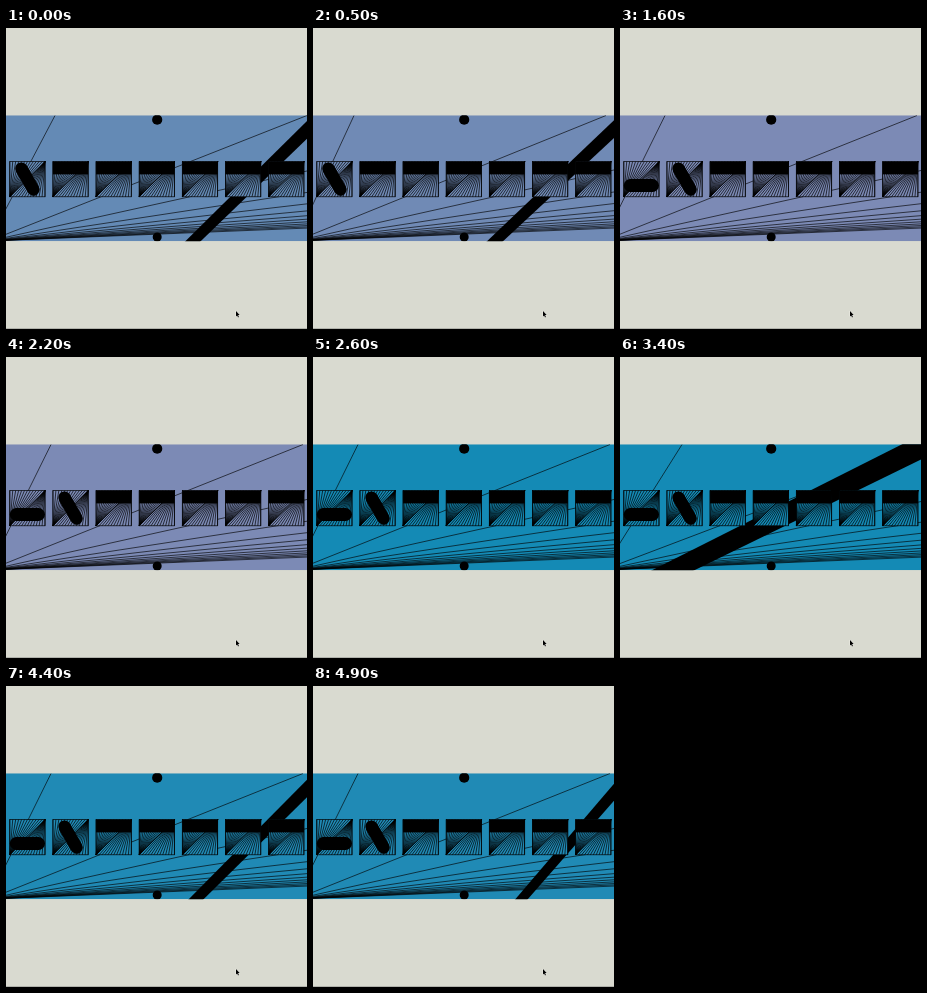
Write an HTML page with a canvas that moves like this. It is 301 px wide and 301 px high and loops after 5 s.

```html
<!DOCTYPE html>
<html lang="en">
<head>
<meta charset="utf-8">
<title>Bars and rays</title>
<style>
html, body { margin: 0; width: 100%; height: 100%; overflow: hidden; background: #d9dad0; }
canvas { display: block; width: 100vw; height: 100vh; }
</style>
</head>
<body>
<canvas id="stage"></canvas>
<script>
const SIZE = 301, LOOP = 5000, STEP = 100;
const TOP = 87.3, BOTTOM = 213.2;
const BOX = 35.2, BOX_X = 3.8, BOX_Y = 133.6, PITCH = 43.15;
const RAYS = 12;

// [time, value] keys
const FAN = [[0, 49], [1000, 33], [1600, 45], [2600, 45], [3400, 62], [4000, 45], [5000, 45]];
const FOOT = [[0, 187], [1000, 177], [1600, 345], [2600, 345], [3400, 53], [4000, 177], [4900, 208.5], [5000, 212]];
const REDS = [[0, 100], [200, 112], [1400, 124], [2600, 20], [3800, 32]];

const canvas = document.getElementById('stage');
const ctx = canvas.getContext('2d');

function ease(keys, t) {
  const i = Math.max(1, keys.findIndex(k => k[0] >= t));
  const [t0, a] = keys[i - 1], [t1, b] = keys[i];
  const u = (t - t0) / (t1 - t0);
  return a + (b - a) * u * u * (3 - 2 * u);
}

function hold(keys, t) {
  return keys.filter(k => k[0] <= t).pop()[1];
}

function line(x0, y0, x1, y1, width, cap = 'butt') {
  ctx.lineWidth = width;
  ctx.lineCap = cap;
  ctx.beginPath();
  ctx.moveTo(x0, y0);
  ctx.lineTo(x1, y1);
  ctx.stroke();
}

function dot(x, y, r) {
  ctx.beginPath();
  ctx.arc(x, y, r, 0, Math.PI * 2);
  ctx.fill();
}

function clipRect(x, y, w, h) {
  ctx.beginPath();
  ctx.rect(x, y, w, h);
  ctx.clip();
}

function box(i, state, color) {
  ctx.save();
  ctx.translate(BOX_X + i * PITCH, BOX_Y);
  ctx.fillStyle = color;
  ctx.fillRect(0, 0, BOX, BOX);
  ctx.fillStyle = '#000';

  // One fan from the lower left corner, one from the upper right.
  for (let k = 0; k <= RAYS; k++) {
    const x = k * BOX / RAYS;
    line(0, BOX, x, 0, 0.7);
    line(BOX, 0, x, BOX, 0.7);
  }
  if (state === 'todo') {
    ctx.fillRect(0, 0, BOX, 12.8);
  } else if (state === 'done') {
    line(6.5, 23.9, BOX - 6.5, 23.9, 13, 'round');
  } else {
    line(11.6, 7.1, 23.6, 27.9, 12.5, 'round');
  }
  ctx.lineWidth = 0.7;
  ctx.strokeRect(0, 0, BOX, BOX);
  ctx.restore();
}

// Swings about a point beyond the right edge and widens towards it.
function beam(foot) {
  if (foot > 300) return;
  const px = 325.5, py = 78, over = 40;
  const length = Math.hypot(px - foot, BOTTOM - py);
  const near = (11.3 - 0.061 * (foot - 177)) / 2;
  const half = d => near + 0.006 * d;
  ctx.save();
  ctx.translate(foot, BOTTOM);
  ctx.rotate(Math.atan2(py - BOTTOM, px - foot));
  ctx.beginPath();
  ctx.moveTo(-over, -half(-over));
  ctx.lineTo(length + over, -half(length + over));
  ctx.lineTo(length + over, half(length + over));
  ctx.lineTo(-over, half(-over));
  ctx.fill();
  ctx.restore();
}

function pointer(x, y) {
  ctx.beginPath();
  [[0, 0], [0, 5.4], [1.2, 4.4], [2, 6.4], [2.9, 6], [2.1, 4.1], [3.7, 4]]
    .forEach(([dx, dy]) => ctx.lineTo(x + dx, y + dy));
  ctx.closePath();
  ctx.strokeStyle = '#f4f4ee';
  ctx.lineWidth = 0.8;
  ctx.stroke();
  ctx.fill();
}

function draw(t) {
  ctx.setTransform(canvas.width / SIZE, 0, 0, canvas.height / SIZE, 0, 0);
  ctx.fillStyle = '#d9dad0';
  ctx.fillRect(0, 0, SIZE, SIZE);
  ctx.fillStyle = '#b0b1aa';
  ctx.fillRect(0, SIZE - 1, SIZE, 1);

  const color = `rgb(${hold(REDS, t)}, 138, 181)`;
  ctx.save();
  clipRect(0, TOP, SIZE, BOTTOM - TOP);
  ctx.fillStyle = color;
  ctx.fillRect(0, TOP, SIZE, BOTTOM - TOP);
  ctx.fillStyle = ctx.strokeStyle = '#000';

  const fan = ease(FAN, t);
  for (let k = 0; k <= RAYS; k++) line(-17, 213, fan + k * 252, 87.5, 0.65);
  beam(ease(FOOT, t));

  const active = t < 1400 ? 0 : 1;
  for (let i = 0; i < 7; i++) {
    box(i, i < active ? 'done' : i === active ? 'turning' : 'todo', color);
  }
  dot(151.2, 91.7, 5.1);
  dot(151.2, 209, 4.5);
  ctx.restore();

  ctx.fillStyle = '#000';
  pointer(230, 283);
}

function resize() {
  const ratio = window.devicePixelRatio || 1;
  canvas.width = Math.round(innerWidth * ratio);
  canvas.height = Math.round(innerHeight * ratio);
}

const start = performance.now();
function tick() {
  const t = (performance.now() - start) % LOOP;
  draw(Math.floor(t / STEP) * STEP);
  requestAnimationFrame(tick);
}

addEventListener('resize', resize);
resize();
tick();
</script>
</body>
</html>
```
